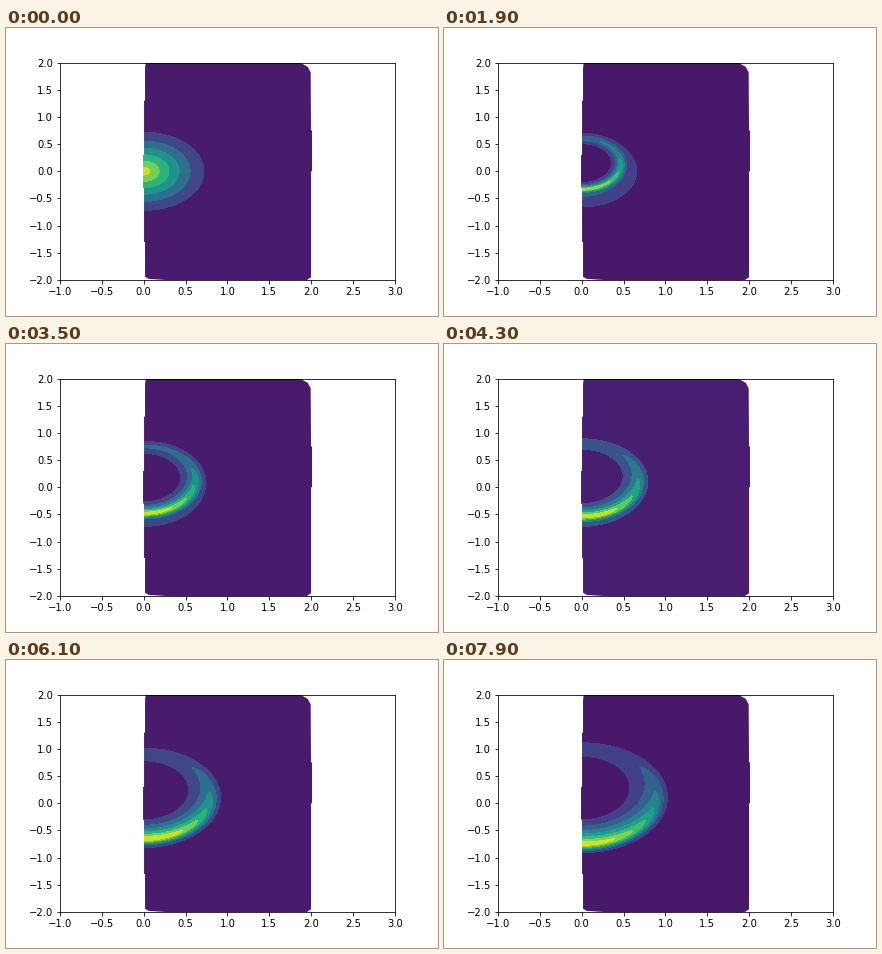
These frames come from a looping animation (432x288 px, 8000 ms). A matplotlib script:

```python
import numpy as np
import matplotlib.pyplot as plt
from matplotlib.animation import FuncAnimation
from matplotlib.patches import Polygon

FRAMES, STEP = 80, 100
CENTRE = 0.135  # height of the blast above the cloud core

X, Y = np.meshgrid(np.linspace(-0.02, 2.03, 206), np.linspace(-2, 2, 401))

# Undisturbed cloud, densest at the origin
core = np.hypot(X, Y)
cloud = 10 * np.exp(-1.49 * core - 2.22 * core ** 3)

r = np.hypot(X, Y - CENTRE)
below = (0.5 - 0.5 * (Y - CENTRE) / np.maximum(r, 1e-9)) ** 1.1  # 0 up, 1 down


def decay(t, rest, extra, rate):
    return rest + extra * np.exp(-rate * (t - 1))


def density(t):
    """Cloud with an expanding shell that is denser towards the core."""
    if t == 0:
        return cloud
    front = 0.345 * t ** 0.45
    bottom = decay(t, 5.35, 12.65, 0.4)
    top = decay(t, 0.9, 7.3, 0.45)
    peak = top ** (1 - below) * bottom ** below
    fall = 9.2 * t ** -0.55 * (0.78 + 0.22 * below)
    spread = 0.038 * t ** 0.58 * (1.2 - 0.4 * below)
    inside = peak * (r / front) ** fall
    blur = np.exp(-((r - front) / spread) ** 2)
    outside = cloud + np.maximum(peak - cloud, 0) * blur
    return np.where(r < front, inside, outside)


fig = plt.figure(figsize=(6, 4), dpi=72, facecolor="white")
ax = fig.add_axes([0.125, 0.125, 0.775, 0.755])
ax.tick_params(labelsize=10)
ax.set(xlim=(-1, 3), ylim=(-2, 2))

# Slightly uneven outline of the computed region
left = [(.025, 2), (.016, 1.9), (.016, 1.3), (.004, 1.3), (.004, .3),
        (-.008, .3), (-.008, -.3), (.004, -.3), (.004, -1.3), (.016, -1.3),
        (.016, -1.94), (.06, -1.98), (.27, -2)]
right = [(1.95, -2), (1.999, -1.95), (1.999, 0), (2.011, 0), (2.011, .75),
         (1.999, .75), (1.995, 1.82), (1.96, 1.92), (1.87, 2)]
edge = Polygon(left + right, transform=ax.transData)
shown = []


def draw(i):
    while shown:
        shown.pop().remove()
    fill = ax.contourf(X, Y, density(i * STEP / 1000), cmap="viridis")
    fill.set_clip_path(edge)
    ax.set(xlim=(-1, 3), ylim=(-2, 2))
    shown.append(fill)
    return shown


anim = FuncAnimation(fig, draw, frames=FRAMES, interval=STEP,
                     repeat=True, repeat_delay=0, blit=False)
plt.show()
```
